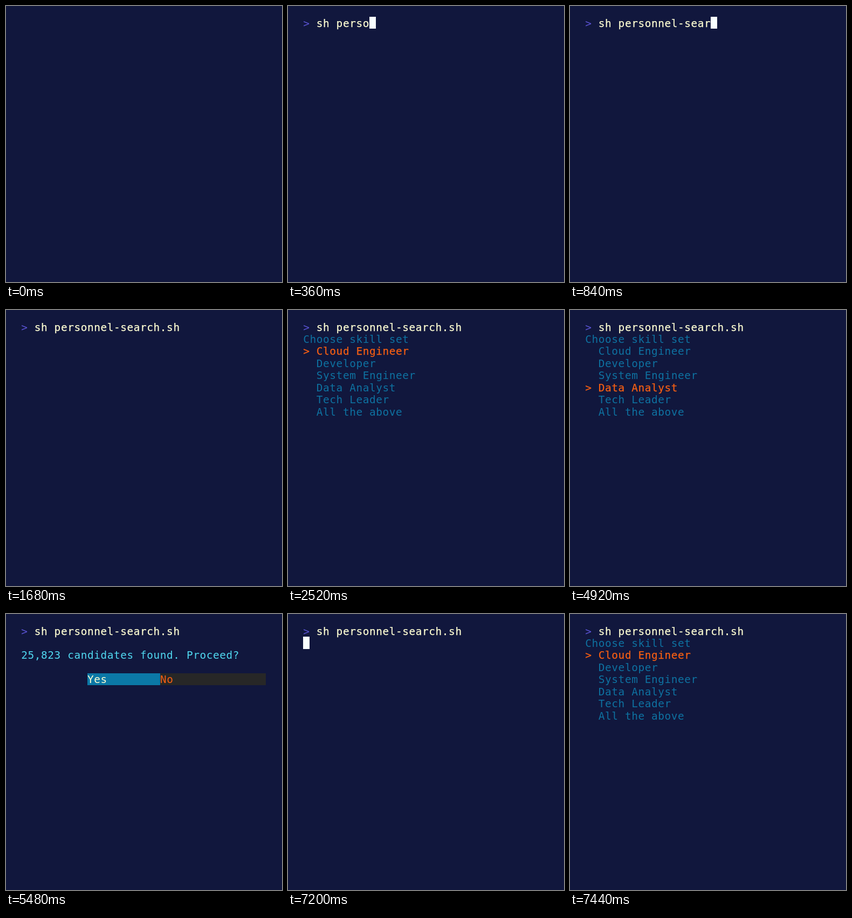
An HTML page for the animation above (8 s loop, 512 by 512 pixels).

```html
<!DOCTYPE html>
<html lang="en">
<head>
<meta charset="utf-8">
<title>Personnel search</title>
<style>
  html, body { margin: 0; width: 100%; height: 100%; overflow: hidden; background: #11173d; }
  svg { display: block; width: 100%; height: 100%; }
  text {
    font: 19.4px "DejaVu Sans Mono", monospace;
    letter-spacing: 0.59px;
    white-space: pre;
    fill: #0e72a1;
  }
  .prompt { fill: #5a53d2; }
  .typed, .yes { fill: #fdfdd2; }
  .active, .no { fill: #f65f13; }
  .typed, .active { stroke: currentColor; stroke-width: 0.25px; stroke-linejoin: round; }
  .typed { color: #fdfdd2; }
  .active { color: #f65f13; }
  .found { fill: #50d8f0; }
  .cursor { fill: #f9ffff; }
  .yes-box { fill: #0b78a6; }
  .no-box { fill: #272727; }
</style>
</head>
<body>
<svg id="stage" viewBox="0 0 512 512"></svg>
<script>
const LOOP = 8000, TICK = 40;
const LEFT = 28, TOP = 20, COL = 12.27, ROW = 22.43, BASE = 18.5, INSET = 0.3;
const COMMAND = 'sh personnel-search.sh';
const SKILLS = ['Cloud Engineer', 'Developer', 'System Engineer', 'Data Analyst', 'Tech Leader', 'All the above'];

// [start in ms, view, selected skill]
const SCENES = [
  [0, 'typing'], [1680, 'idle'], [2120, 'waiting'], [2480, 'idle'],
  [2520, 'menu', 0], [4360, 'menu', 1], [4640, 'menu', 2], [4920, 'menu', 3],
  [5200, 'waiting'], [5480, 'confirm'], [7200, 'waiting'], [7440, 'menu', 0]
];

const stage = document.getElementById('stage');

const text = (col, row, str, cls = '') =>
  `<text class="${cls}" x="${LEFT + col * COL + INSET}" y="${TOP + row * ROW + BASE}">${str}</text>`;

function block(col, row, cols, cls) {
  const x = Math.round(LEFT + col * COL), right = Math.round(LEFT + (col + cols) * COL);
  const y = Math.round(TOP + row * ROW), bottom = Math.round(TOP + (row + 1) * ROW);
  return `<rect class="${cls}" x="${x}" y="${y}" width="${right - x}" height="${bottom - y}"/>`;
}

const cursor = (col, row) => block(col, row, 1, 'cursor');

const menu = selected => text(0, 1, 'Choose skill set') + SKILLS.map((skill, i) =>
  i === selected ? text(0, i + 2, '&gt; ' + skill, 'active') : text(2, i + 2, skill)).join('');

const confirm = () => text(0, 2, '25,823 candidates found. Proceed?', 'found') +
  block(10, 4, 11, 'yes-box') + block(21, 4, 16, 'no-box') +
  text(10, 4, 'Yes', 'yes') + text(21, 4, 'No', 'no');

// Four keystrokes in every five ticks
function typedCount(t) {
  const tick = Math.floor(t / TICK);
  return Math.min(COMMAND.length, tick - Math.floor(tick / 5));
}

function draw(t) {
  const count = typedCount(t);
  if (!count) return '';
  const [, view, selected] = SCENES.filter(scene => scene[0] <= t).pop();
  const line = text(0, 0, '&gt;', 'prompt') + text(2, 0, COMMAND.slice(0, count), 'typed');
  const views = {
    typing: () => cursor(2 + count, 0),
    idle: () => '',
    waiting: () => cursor(0, 1),
    menu: () => menu(selected),
    confirm
  };
  return line + views[view]();
}

let shown = '';
const start = performance.now();

function frame() {
  const markup = draw((performance.now() - start) % LOOP);
  if (markup !== shown) stage.innerHTML = shown = markup;
  requestAnimationFrame(frame);
}
frame();
</script>
</body>
</html>
```
